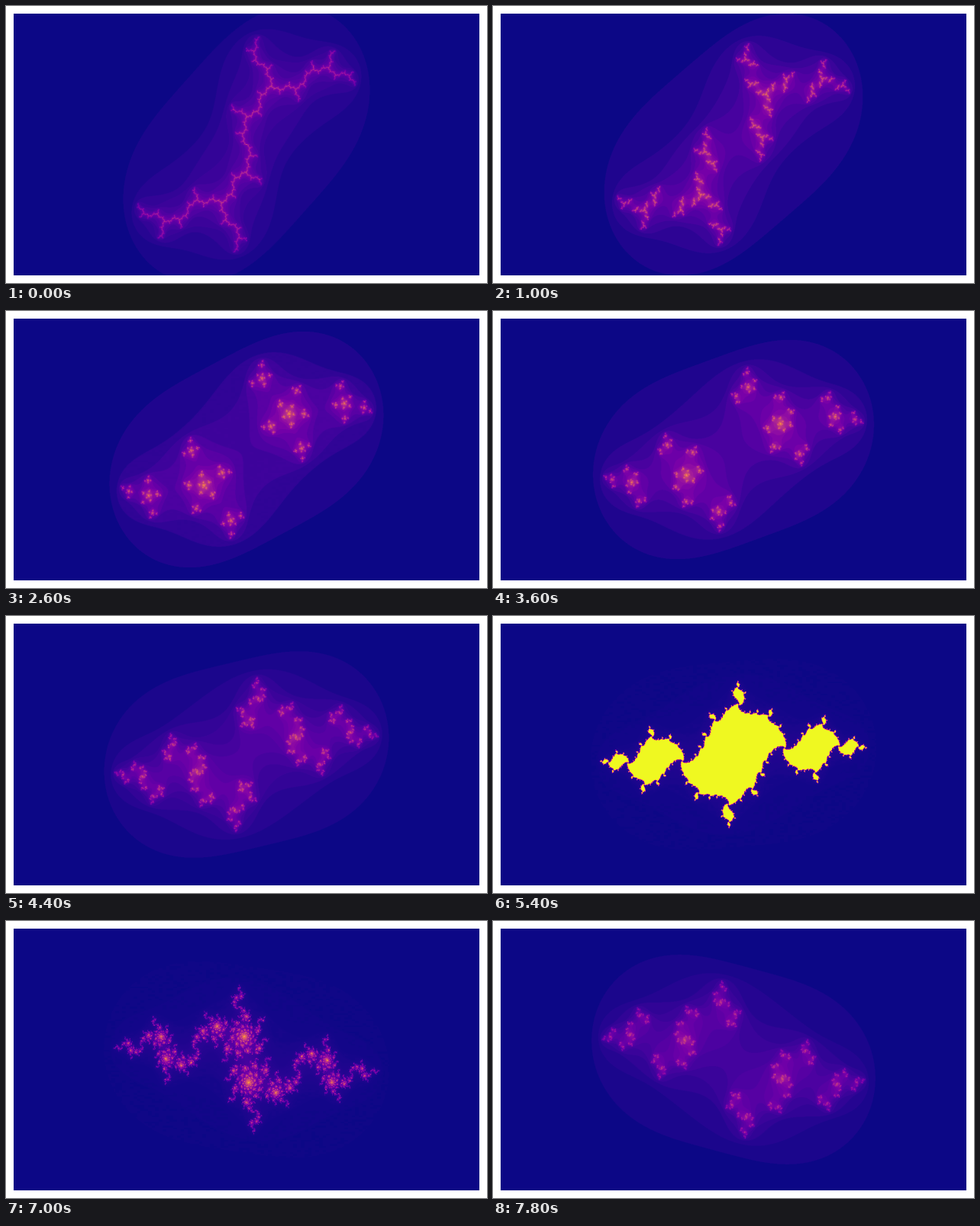
Write a matplotlib script that moves like this. It is 630 by 363 pixels and loops after 8000 ms.

```python
import numpy as np
import matplotlib.pyplot as plt
from matplotlib.animation import FuncAnimation

W, H, DPI = 630, 363, 100
FRAMES, INTERVAL = 40, 200
MAX_ITER = 256
NX, NY = 610, 343            # grid half sizes; the grid holds z = 0 exactly
X_MAX, Y_MAX = 2.8, 1.4

x = np.arange(-NX, NX + 1) * (X_MAX / NX)
y = np.arange(-NY, 1) * (Y_MAX / NY)
grid = (x[None, :] + 1j * y[:, None]).ravel()
# With |c| = 1, anything outside this disc escapes on the first step.
near = np.flatnonzero(np.abs(grid) <= 1.74)


def julia(c):
    """Escape counts of z -> z*z + c; the lower half mirrors the upper."""
    counts = np.zeros(grid.size)
    idx, z = near, grid[near]
    for n in range(MAX_ITER):
        z = z * z + c
        inside = z.real ** 2 + z.imag ** 2 <= 4
        counts[idx[~inside]] = n
        idx, z = idx[inside], z[inside]
        if not idx.size:
            break
    counts[idx] = MAX_ITER
    top = counts.reshape(NY + 1, 2 * NX + 1)
    return np.vstack([top, top[-2::-1, ::-1]])


def constant(frame):
    return np.exp(1j * (np.pi / 2 + frame * np.pi / 60))


fig = plt.figure(figsize=(W / DPI, H / DPI), dpi=DPI, facecolor="white")
ax = fig.add_axes([10 / W, 10 / H, 610 / W, 343 / H])
ax.axis("off")
image = ax.imshow(julia(constant(0)), cmap="plasma", aspect="auto",
                  interpolation="hanning")


def update(frame):
    image.set_data(julia(constant(frame)))
    image.autoscale()
    return [image]


anim = FuncAnimation(fig, update, frames=FRAMES, interval=INTERVAL,
                     repeat=True, repeat_delay=0)
plt.show()
```
